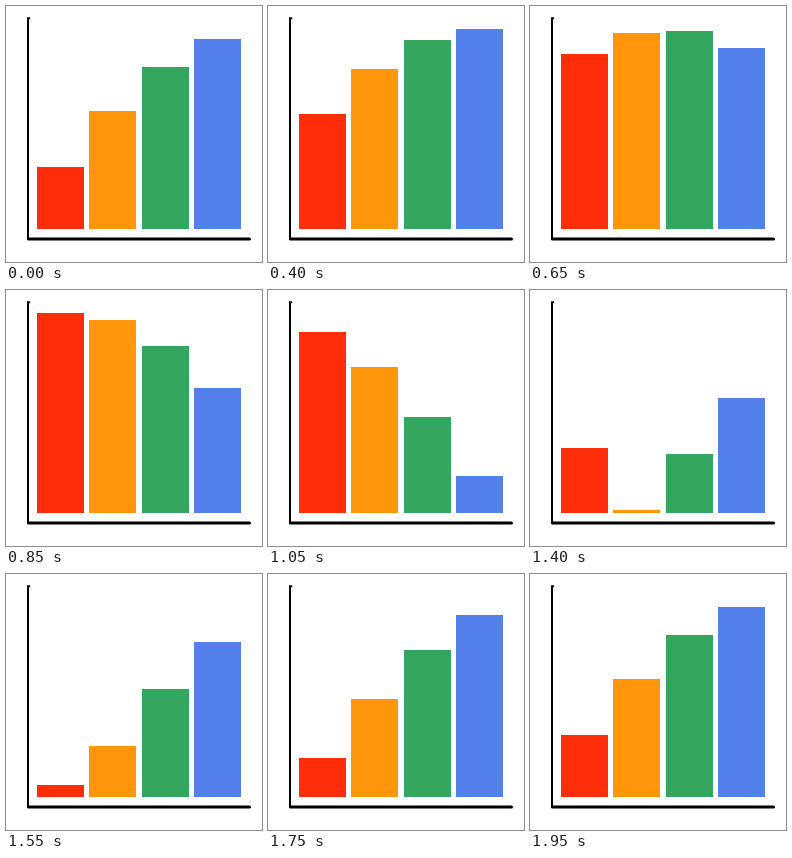
Write an HTML page that moves like this. It is 256 px wide and 256 px high and loops after 8000 ms.

```html
<!DOCTYPE html>
<html lang="en">
<head>
<meta charset="utf-8">
<title>Bar wave</title>
<style>
  html, body { margin: 0; width: 100%; height: 100%; overflow: hidden; background: #fff; }
  svg { display: block; width: 100vw; height: 100vh; }
  .axis { fill: none; stroke: #000; stroke-linecap: round; }
</style>
</head>
<body>
<svg viewBox="0 0 256 256">
  <g id="bars" shape-rendering="crispEdges"></g>
  <path class="axis" stroke-width="2" d="M23.3 12.3H22V233"/>
  <path class="axis" stroke-width="3.2" d="M22.6 233H243.4"/>
</svg>
<script>
const LOOP = 8000, MOVE = 1997, REST = 1950, TICK = 50;
const BASE = 223, PEAK = 200, WIDTH = 47, LEFT = 31, PITCH = 157 / 3;
const COLORS = ['#ff2d0a', '#ff960b', '#34a65d', '#5380ea'];
const STAGGER = Math.PI / 10;

const group = document.getElementById('bars');
const bars = COLORS.map((color, i) => {
  const bar = document.createElementNS('http://www.w3.org/2000/svg', 'rect');
  bar.setAttribute('x', Math.round(LEFT + i * PITCH));
  bar.setAttribute('width', WIDTH);
  bar.setAttribute('fill', color);
  group.append(bar);
  return bar;
});

const easeSine = x => (1 - Math.cos(Math.PI * x)) / 2;

function draw(time) {
  // The wave advances in ticks, then rests until the loop restarts.
  const t = Math.floor((time % LOOP) / TICK) * TICK;
  const phase = Math.PI * (t < REST ? easeSine(t / MOVE) : 1);
  bars.forEach((bar, i) => {
    const height = PEAK * Math.abs(Math.sin(phase + (i + 1) * STAGGER));
    const top = Math.round(BASE - height);
    bar.setAttribute('y', top);
    bar.setAttribute('height', BASE - top);
  });
}

const start = performance.now();
function frame() {
  draw(performance.now() - start);
  requestAnimationFrame(frame);
}
frame();
</script>
</body>
</html>
```
